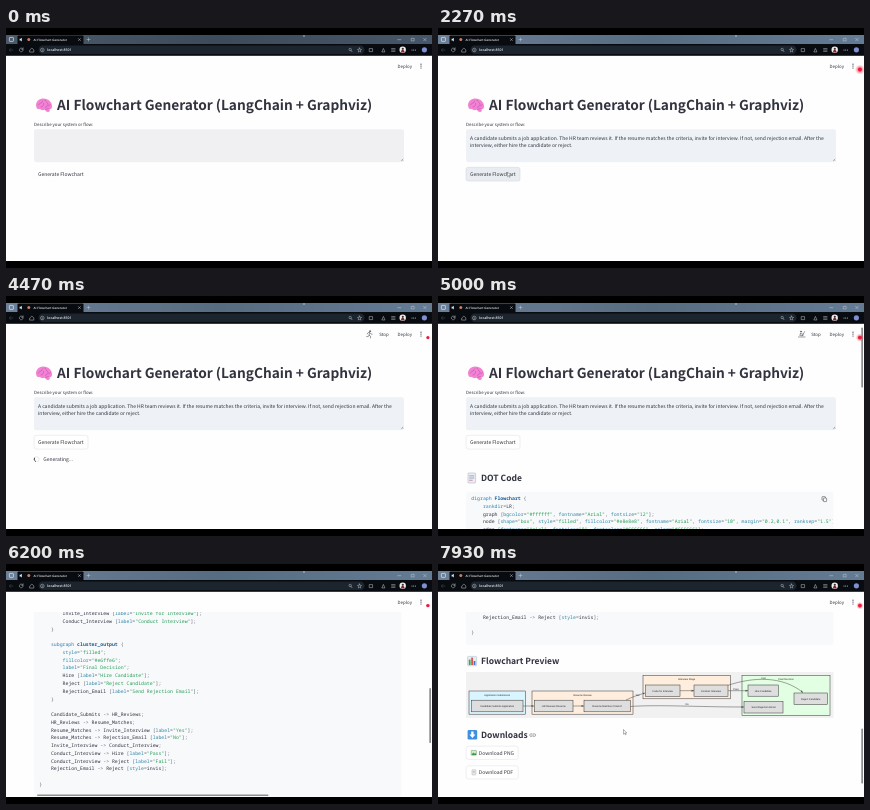
These frames come from a looping animation (426x240 px, 8000 ms). An HTML page:

```html
<!DOCTYPE html>
<html lang="en">
<head>
<meta charset="utf-8">
<title>AI Flowchart Generator</title>
<style>
html, body { margin: 0; width: 100%; height: 100%; overflow: hidden; background: #000; }
svg { display: block; width: 426px; height: 240px; }
text { white-space: pre; text-rendering: geometricPrecision; fill: #31333f;
  font-family: "Noto Sans CJK JP", "Noto Sans CJK SC", "Noto Sans CJK", "Open Sans", sans-serif; }
.b { font-weight: 700; }
.ui { font-family: "Open Sans", sans-serif; fill: #eef1f4; }
.code text { font: 4.85px "Noto Sans Mono", monospace; }
.code .kw { fill: #2b7fb5; }
.code .name { fill: #165a94; font-weight: 700; }
.code .attr { fill: #2f86a6; }
.code .str { fill: #259b55; }
.code .pun { fill: #5d646e; }
.graph text { font: 2.5px "Liberation Sans", Arial, sans-serif; text-anchor: middle; fill: #222; }
.line { fill: none; stroke-linecap: round; stroke-linejoin: round; }
</style>
</head>
<body>
<svg viewBox="0 0 426 240" xmlns="http://www.w3.org/2000/svg">
  <defs>
    <linearGradient id="slate">
      <stop offset="0" stop-color="#6c8098"/><stop offset=".5" stop-color="#566c80"/><stop offset="1" stop-color="#647b95"/>
    </linearGradient>
    <radialGradient id="halo">
      <stop offset=".3" stop-color="#f0284b" stop-opacity=".6"/><stop offset="1" stop-color="#f0284b" stop-opacity="0"/>
    </radialGradient>
    <clipPath id="view"><rect y="27" width="426" height="206"/></clipPath>
    <clipPath id="box"><rect x="28" y="190" width="366.6" height="400"/></clipPath>
    <marker id="tip" viewBox="0 0 6 6" refX="5.5" refY="3" markerWidth="5" markerHeight="5" orient="auto">
      <path d="M0 .8L6 3L0 5.2z" fill="#555"/>
    </marker>
  </defs>

  <rect width="426" height="240"/>
  <rect y="27" width="426" height="206" fill="#fefefe"/>

  <g clip-path="url(#view)">
    <g id="page">
      <g transform="translate(38 77)">
        <path d="M-7.8 1.4C-8.6-2.6-5.6-6.6-1-6.6C4-6.8 8-3 7.9 .6C8.6 3 7.2 4.2 5.6 4.2C6.4 6 5.2 7.2 3.8 7C2.4 6.8 1.6 6 .8 4.8C-1.6 5.6-3.4 5-4 3.8C-6 4.4-7.6 3.4-7.8 1.4z" fill="#f083d2"/>
        <path class="line" d="M-5.5 0C-4-3-2-1-1.4-4M-3 2C-1 2 0 0-.4-1.6M1-5C1-3 4-3 4-.6M1.6 2.6C2-.4 5 1.6 6.4-.4M1.6 4.4L4.4 3.4" stroke="#cf52b4" stroke-width=".7"/>
      </g>
      <text class="b" x="51" y="82.2" font-size="13.7">AI Flowchart Generator (LangChain + Graphviz)</text>
      <text x="28" y="97.7" font-size="4.35">Describe your system or flow:</text>
      <rect id="area" x="28" y="101.3" width="370" height="33" rx="2.2"/>
      <path d="M395.2 132.8l2-2M396.6 132.8l.7-.7" stroke="#666" stroke-width=".5"/>
      <g id="prompt" font-size="4.98">
        <text x="32" y="111.6">A candidate submits a job application. The HR team reviews it. If the resume matches the criteria, invite for interview. If not, send rejection email. After the</text>
        <text x="32" y="119.2">interview, either hire the candidate or reject.</text>
      </g>
      <rect id="button" x="28" y="139.3" width="54" height="13.8" rx="2.2" stroke-width=".5"/>
      <text x="32" y="148.1" font-size="5">Generate Flowchart</text>
      <g id="wait">
        <circle cx="30.6" cy="163.2" r="2.5" fill="none" stroke="#e1e3e8" stroke-width=".8"/>
        <path id="arc" class="line" d="M30.6 160.7A2.5 2.5 0 0 1 33.1 163.2" stroke="#31333f" stroke-width=".8"/>
        <text x="37.2" y="165" font-size="5">Generating...</text>
      </g>
      <g id="result"></g>
    </g>
    <rect y="27" width="426" height="21" fill="#fefefe"/>
    <g id="run">
      <g id="runner" class="line" stroke="#5a5c66" stroke-width=".6">
        <circle cx="364" cy="35.2" r=".6" fill="#5a5c66"/>
        <path d="M361.3 38L362 36.6L364 36.6L365 38L366.2 38.2M363.6 37L363 39.2L364.6 40.2L364.5 42M363 39.2L362.3 40.6L360.6 40.6"/>
      </g>
      <g id="rower" class="line" stroke="#5a5c66" stroke-width=".6">
        <circle cx="363" cy="35.6" r=".6" fill="#5a5c66"/>
        <path d="M362.6 37.2L361.8 39.4L365 39.4M362.8 37.6L365.2 38.2M360.4 41L367 41M366.6 35.6L364.2 40"/>
      </g>
      <text x="373.2" y="39.8" font-size="4.4">Stop</text>
    </g>
    <text x="391.6" y="39.8" font-size="4.4">Deploy</text>
    <g fill="#31333f"><circle cx="415" cy="36.2" r=".6"/><circle cx="415" cy="38.1" r=".6"/><circle cx="415" cy="40" r=".6"/></g>
    <rect id="thumb" x="423.3" width="1.7" rx=".85" fill="#8c8c8c"/>
  </g>

  <g id="chrome">
    <rect id="strip" y="7" width="426" height="9.5" fill="url(#slate)"/>
    <rect x="11.5" y="7.4" width="66" height="9.4" rx="1.2" fill="#080b0f"/>
    <rect y="16" width="426" height="11.8" fill="#080b0f"/>
    <rect x="32.5" y="17.6" width="326" height="8.4" rx="4.2" fill="#1c242d"/>
    <rect x="3.4" y="9.4" width="4" height="4" rx=".6" fill="none" stroke="#e3e9ee" stroke-width=".7"/>
    <path d="M13.6 10.8h1l1.2-1v3.6l-1.2-1h-1z" fill="#e3e8ec"/>
    <circle cx="22.8" cy="11.6" r="1.5" fill="#c8806c"/>
    <text class="ui" x="27.6" y="12.7" font-size="3" font-weight="600">AI Flowchart Generator</text>
    <text class="ui" x="41.3" y="23.2" font-size="3.5" font-weight="600">localhost:8501</text>
    <path class="line" stroke="#c3cbd2" stroke-width=".5" d="M72.4 10.6l2 2m0-2l-2 2M81 11.5h3M82.5 10v3M391.8 11.7h3M417.6 10.3l2.6 2.6m0-2.6l-2.6 2.6M405.6 10.4h2.6v2.5h-2.6z
      M17 21.2a1.9 1.9 0 1 0 .1 1.2M17.1 19.8v1.5h-1.5M24 21.8l1.9-1.7l1.9 1.7v2.3h-3.8z
      M36.3 21.6v1.4M345 22.4l1 1.3M353.5 20l.6 1.3l1.4.2l-1 1l.2 1.4l-1.2-.6l-1.2.6l.2-1.4l-1-1l1.4-.2z
      M363.6 20.6h3v3h-3zM376 23.6l1.4-3.2l1.4 3.2zM385.6 20.6h3.4M385.6 22h3.4M385.6 23.4h3.4"/>
    <path class="line" stroke="#4a525a" stroke-width=".5" d="M7 22H3.4m1.5-1.6L3.4 22l1.5 1.6"/>
    <g fill="none" stroke="#c3cbd2" stroke-width=".5"><circle cx="36.3" cy="22" r="1.8"/><circle cx="344.2" cy="21.5" r="1.2"/></g>
    <circle cx="396.7" cy="21.8" r="3.2" fill="#f0eeec"/>
    <path d="M395 24.4c0-2 1-2.6 1.7-2.6s1.8.6 1.8 2.6z" fill="#7b2430"/><circle cx="396.8" cy="20.8" r="1.1" fill="#333"/>
    <g fill="#d5dce1"><circle cx="406" cy="22" r=".5"/><circle cx="407.7" cy="22" r=".5"/><circle cx="409.4" cy="22" r=".5"/><circle cx="298" cy="8" r=".7"/></g>
    <circle cx="418.4" cy="21.8" r="2.6" fill="#7f8fd0"/>
  </g>

  <g id="rec"><circle id="glow" cx="421.9" cy="41.6" fill="url(#halo)"/><circle id="dot" cx="421.9" cy="41.6" fill="#ec1c3a"/></g>
  <path id="cursor" d="M0 0V4.7L1.2 3.7L1.9 5.4L2.6 5L1.9 3.4H3.3z" fill="#fff" stroke="#444" stroke-width=".4"/>
</svg>
<script>
const LOOP = 8000, PASTE = 1270, HOVER = 2070, CLICK = 2470, DONE = 4800, IDLE = 6070, LEAVE = 6900;
const $ = id => document.getElementById(id);
const show = (id, on) => $(id).style.display = on ? '' : 'none';

const cluster = (id, fill, label, nodes) => `    subgraph cluster_${id} {
        style="filled";
        fillcolor="${fill}";
        label="${label}";
${nodes.map(([n, l]) => `        ${n} [label="${l}"];`).join('\n')}
    }
`;
const dot = `digraph Flowchart {
    rankdir=LR;
    graph [bgcolor="#ffffff", fontname="Arial", fontsize="12"];
    node [shape="box", style="filled", fillcolor="#e8e8e8", fontname="Arial", fontsize="10", margin="0.2,0.1", ranksep="1.5"];
    edge [fontname="Arial", fontsize="8", fontcolor="#666666", color="#666666"];

` + [
  cluster('input', '#d9f5ff', 'Application Submission', [['Candidate_Submits', 'Candidate Submits Application']]),
  cluster('review', '#fff0e0', 'Resume Review', [['HR_Reviews', 'HR Reviews Resume'], ['Resume_Matches', 'Resume Matches Criteria?']]),
  cluster('interview', '#fff0e0', 'Interview Stage', [['Invite_Interview', 'Invite for Interview'], ['Conduct_Interview', 'Conduct Interview']]),
  cluster('output', '#e6ffe6', 'Final Decision', [['Hire', 'Hire Candidate'], ['Reject', 'Reject Candidate'], ['Rejection_Email', 'Send Rejection Email']])
].join('\n') + `
    Candidate_Submits -> HR_Reviews;
    HR_Reviews -> Resume_Matches;
    Resume_Matches -> Invite_Interview [label="Yes"];
    Resume_Matches -> Rejection_Email [label="No"];
    Invite_Interview -> Conduct_Interview;
    Conduct_Interview -> Hire [label="Pass"];
    Conduct_Interview -> Reject [label="Fail"];
    Rejection_Email -> Reject [style=invis];

}`;

const tokens = /("[^"]*")|\b(digraph|subgraph)\b|\b(Flowchart|cluster_\w+)|(\w+)(?==)|(->|[[\]{};,=])/g;
const kinds = ['str', 'kw', 'name', 'attr', 'pun'];
const paint = s => s.replace(tokens, (m, ...g) =>
  `<tspan class="${kinds[g.slice(0, 5).findIndex(Boolean)]}">${m.replace('>', '&gt;')}</tspan>`);

const code = dot.split('\n').map((s, i) => {
  const pad = s.length - s.trimStart().length;
  return `<text x="${33.3 + pad * 2.91}" y="${204.1 + i * 7.77}">${paint(s.trim())}</text>`;
}).join('');

const rect = (x, y, r, b, fill, stroke = 'none', w = .5, rx = 0) =>
  `<rect x="${x}" y="${y}" width="${r - x}" height="${b - y}" fill="${fill}" stroke="${stroke}" stroke-width="${w}" rx="${rx}"/>`;
const label = (x, y, s, size, cls = '') => `<text class="${cls}" x="${x}" y="${y}" font-size="${size}">${s}</text>`;
const head = (y, s) => label(43, y, s, 8.5, 'b');
const group = (x, y, r, b, fill, s) => rect(x, y, r, b, fill, '#333') + label((x + r) / 2, y + 4.8, s, 2.5);
const node = (x, y, r, b, s) => rect(x, y, r, b, '#dedede', '#333') + label((x + r) / 2, (y + b) / 2 + .9, s, 2.5);
const edge = d => `<path d="${d}" fill="none" stroke="#555" stroke-width=".55" marker-end="url(#tip)"/>`;

const graph = rect(28, 136, 395.5, 182, '#f1f1f2') +
  group(31, 155, 87.5, 178.2, '#d9f5ff', 'Application Submission') +
  group(94, 155, 195, 178.2, '#ffeedd', 'Resume Review') +
  group(205, 139.6, 292.3, 162.8, '#ffeedd', 'Interview Stage') +
  group(304, 139.6, 392, 179.6, '#e3ffe3', 'Final Decision') +
  node(33.5, 164.2, 85, 175.8, 'Candidate Submits Application') +
  node(96.5, 164.2, 135, 175.8, 'HR Reviews Resume') +
  node(146, 164.2, 192.3, 175.8, 'Resume Matches Criteria?') +
  node(207.5, 149, 242, 160.4, 'Invite for Interview') +
  node(256, 149, 290, 160.4, 'Conduct Interview') +
  node(310, 149, 340.3, 160.2, 'Hire Candidate') +
  node(306, 165.6, 345, 177, 'Send Rejection Email') +
  node(356, 157, 389.4, 168.6, 'Reject Candidate') +
  ['M85 170H96', 'M135 170H146', 'M188 164C194 161 200 159 207 157', 'M192.3 170.5C220 168.5 260 171 306 171',
   'M242 154.7H256', 'M290 154.7H310', 'M290 149.3C315 141 344 139.5 365 156.6'].map(edge).join('') +
  label(199.5, 160.2, 'Yes', 2.3) + label(249, 169.3, 'No', 2.3) + label(298, 153.8, 'Pass', 2.3) + label(325.5, 142.6, 'Fail', 2.3);

const save = (y, s, icon) => rect(28.2, y - 6.6, 80.2, y + 6.6, '#fff', '#dddfe4', .5, 2.2) + icon + label(40.8, y + 1.8, s, 5);

$('result').innerHTML =
  rect(30, 177, 37.6, 187, '#eceef2', '#a9a6bd', .5, .6) + rect(31.2, 179.5, 36.3, 180.3, '#8a93b2') +
  rect(31.2, 181.6, 36.3, 182.4, '#8a93b2') + rect(31.2, 183.8, 34.6, 184.6, '#c07a98') +
  head(185.3, 'DOT Code') +
  rect(28, 196, 395.5, 580, '#f8f9fb', 'none', 0, 2.2) + `<g class="code" clip-path="url(#box)">${code}</g>` +
  `<g id="copy" transform="translate(384 200.6)">${rect(0, 0, 3.4, 3.6, 'none', '#444', .55, .6)}${rect(1.4, 1.4, 4.6, 5, '#f8f9fb', '#444', .55, .6)}</g>
  <g id="bar">${rect(31, 577.8, 262.5, 579.3, '#8f8f8f', 'none', 0, .7)}</g>
  <g id="rest" transform="translate(0 471)">
    ${rect(29.6, 120.4, 38.6, 129.8, '#e7edf2', '#a8b6c2', .5, .8)}${rect(30.8, 123.6, 32.6, 129, '#37a653')}${rect(33.2, 121.6, 35, 129, '#e0524d')}${rect(35.6, 125, 37.4, 129, '#3a78d0')}
    ${head(128.3, 'Flowchart Preview')}
    <g class="graph">${graph}</g>
    ${rect(29.6, 194, 39.2, 203.6, '#3f8fe0', 'none', 0, 1.4)}
    <path d="M34.4 202l-3-3.4h1.8v-3h2.4v3h1.8z" fill="#fff"/>
    ${head(202.2, 'Downloads')}
    <path id="link" class="line" d="M94 197.8h-1a1.3 1.3 0 0 0 0 2.6h1M95.4 197.8h1a1.3 1.3 0 0 1 0 2.6h-1M93.6 199.1h2.2" stroke="#777" stroke-width=".6"/>
    ${save(216.8, 'Download PNG', rect(33.2, 214.4, 38.4, 219.2, '#d4ecd2', '#5d9a58', .5, .5) + '<path d="M33.4 219l1.8-2.6l1.2 1.4l.8-1l1.2 2.2z" fill="#3d9a46"/>')}
    ${save(236.4, 'Download PDF', rect(34, 233.8, 37.8, 238.9, '#eef0f2', '#a4a9b2', .5, .4) + '<path d="M34.9 235.5h2M34.9 236.7h2" stroke="#888" stroke-width=".4"/>')}
  </g>`;

// Rows of [time, value...] read with linear steps between them
const scroll = [[5300, 0], [5600, 130], [5800, 195], [6200, 347], [6600, 471], [6860, 499]];
const toButton = [[1870, 112, 128], [2130, 69.5, 144], [2730, 69.5, 144], [3000, 84, 166]];
const toTitle = [[7070, 150, 204], [7400, 172, 186], [7800, 185.5, 165.5]];

function at(rows, t) {
  const i = rows.findIndex(r => r[0] > t);
  if (i === 0) return rows[0].slice(1);
  if (i < 0) return rows[rows.length - 1].slice(1);
  const a = rows[i - 1], b = rows[i], k = (t - a[0]) / (b[0] - a[0]);
  return a.slice(1).map((v, j) => v + (b[j + 1] - v) * k);
}

function draw(t) {
  const [top] = at(scroll, t), idle = t >= IDLE, fresh = t < 130;
  $('page').setAttribute('transform', `translate(0 ${-top})`);

  $('strip').setAttribute('opacity', fresh ? .7 : 1);
  $('area').setAttribute('fill', fresh ? '#f0f0f2' : '#eef1f5');
  show('prompt', t >= PASTE);
  const hot = t >= HOVER && t < CLICK + 200;
  $('button').setAttribute('fill', hot ? '#e9ecf0' : '#fefefe');
  $('button').setAttribute('stroke', t < HOVER ? '#fafafa' : hot ? '#cfd3d9' : '#dddfe4');

  show('wait', t >= CLICK && t < DONE);
  $('arc').setAttribute('transform', `rotate(${t * .48 + 220} 30.6 163.2)`);
  show('run', t >= CLICK + 200 && !idle);
  show('runner', t < DONE);
  show('rower', t >= DONE);

  show('result', t >= DONE);
  show('rest', idle);
  show('copy', !idle);
  show('bar', t < LEAVE);
  show('link', t >= 7600);
  show('thumb', t >= DONE);
  $('thumb').setAttribute('y', 31.5 + top / (idle ? 3.75 : 3.45));
  $('thumb').setAttribute('height', idle ? 55 : 60);

  const pulse = (1 - Math.cos(t / 1500 * 2 * Math.PI)) / 2;
  show('rec', !fresh);
  $('dot').setAttribute('r', 1.6 + .4 * pulse);
  $('glow').setAttribute('r', 1.6 + 3.4 * pulse);

  const late = t >= 7070;
  show('cursor', late || t >= 1870 && t < 3000);
  $('cursor').setAttribute('transform', `translate(${at(late ? toTitle : toButton, t)})`);
}

const start = performance.now();
function tick() {
  draw((performance.now() - start) % LOOP);
  requestAnimationFrame(tick);
}
tick();
</script>
</body>
</html>
```
